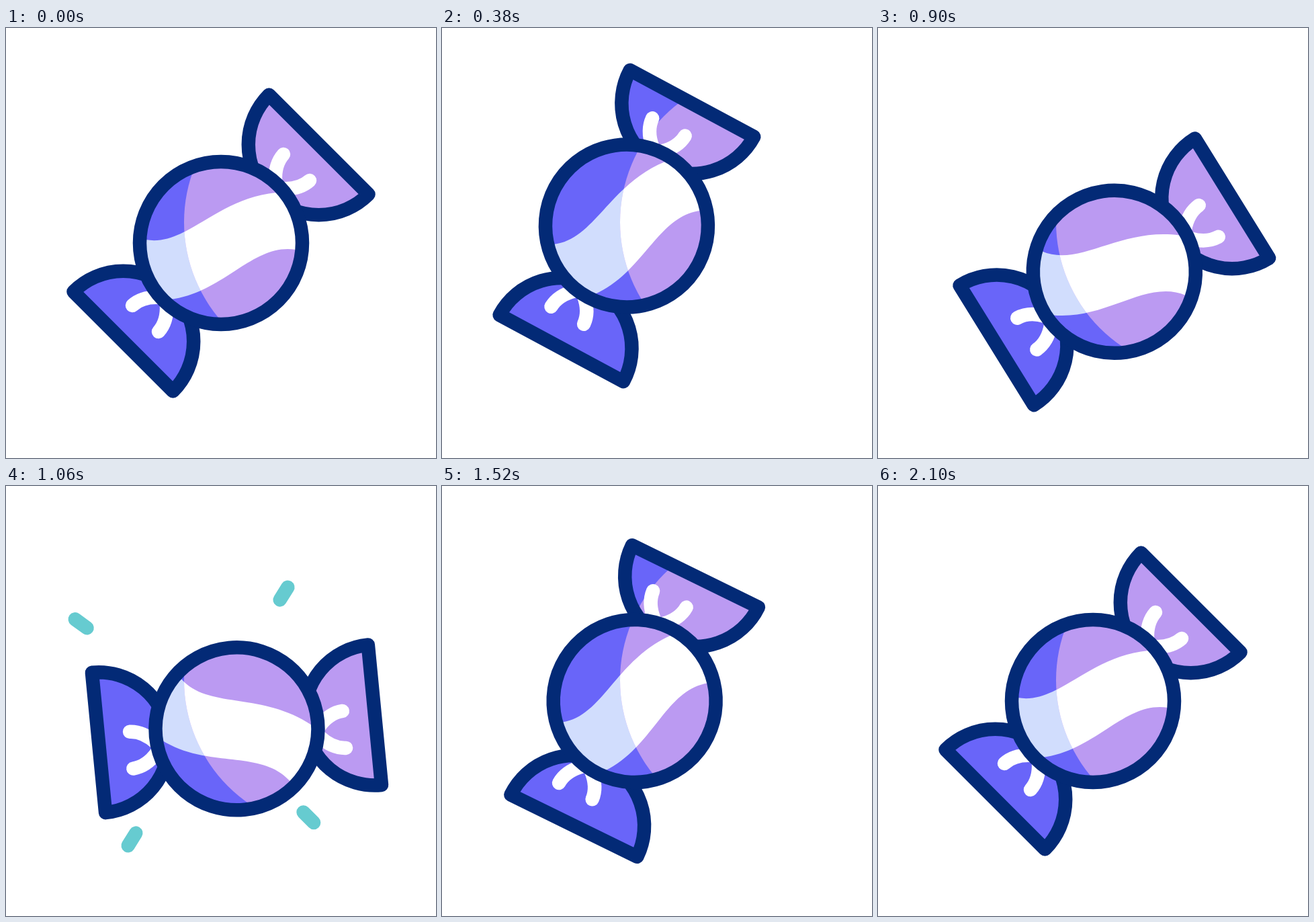
An HTML page with a canvas for the animation above (3.6 s loop, 640x640 px).

```html
<!DOCTYPE html>
<html lang="en">
<head>
<meta charset="utf-8">
<title>Swinging candy</title>
<style>
  html, body { margin: 0; height: 100%; overflow: hidden; background: #fff; }
  canvas { display: block; width: 100vw; height: 100vh; }
</style>
</head>
<body>
<canvas id="stage" width="640" height="640"></canvas>
<script>
const ctx = document.getElementById('stage').getContext('2d');
const LOOP = 3600, LINE = 20.5, REST = 320;
const NAVY = '#032a76', TEAL = '#66cbd0';
const SHADE = { body: '#6965f9', band: '#d1ddfd' };
const LIGHT = { body: '#bb9af2', band: '#ffffff' };

const clamp = u => Math.min(1, Math.max(0, u));
const easeInOut = u => 0.5 - 0.5 * Math.cos(Math.PI * clamp(u));
const easeOut = u => 1 - (1 - clamp(u)) ** 2;

// Swings from rest through each [ms, value] turning point in turn.
function swing(...turns) {
  return t => {
    let from = 0, value = 0;
    for (const [to, target] of turns) {
      value += (target - value) * easeInOut((t - from) / (to - from));
      from = to;
    }
    return value;
  };
}

const shiftX = swing([510, -53], [960, 35.5], [1370, -49], [1765, 0]);
const shiftY = swing([510, -30], [960, 46], [1450, 0]);
const tilt = swing([615, -24.5], [1155, 44.5], [1580, -22], [2100, 0]);
const foldSlide = swing([660, -23.5], [1000, 18], [1480, -20], [2100, 0]);

// Candy shapes, relative to its centre in the resting pose.
const ball = new Path2D();
ball.arc(0, 0, 121, 0, 2 * Math.PI);

const wing = new Path2D();
wing.arc(145.5, -146.5, 104.7, Math.PI / 4, Math.PI * 5 / 4);
wing.closePath();

const folds = new Path2D('M93 -132 C85 -123 80 -110 81 -92 M132 -93 C123 -85 110 -80 92 -81');

const band = new Path2D('M-112 -5 C-52 6 -8 -66 82 -75 L150 -75 L112 10 '
  + 'C48 -1 5 74 -76 84 L-120 84 Z');

// Outer end and heading in degrees of each spark.
const sparks = [[72, 176, -144], [439.5, 118.5, -58], [485, 528, 45], [161.5, 567.5, 122]];

function stroke(path, color) {
  ctx.strokeStyle = color;
  ctx.stroke(path);
}

// Paints once in shade, then again inside the lit circle fixed to the stage.
function paintLit(pose, paint) {
  for (const tone of [SHADE, LIGHT]) {
    ctx.save();
    if (tone === LIGHT) {
      ctx.beginPath();
      ctx.arc(488, 289, 223, 0, 2 * Math.PI);
      ctx.clip();
    }
    pose();
    paint(tone);
    ctx.restore();
  }
}

function drawWing(pose, slide) {
  paintLit(pose, tone => {
    ctx.fillStyle = tone.body;
    ctx.fill(wing);
  });
  ctx.save();
  pose();
  ctx.save();
  ctx.translate(slide * Math.SQRT1_2, slide * Math.SQRT1_2);
  stroke(folds, '#fff');
  ctx.restore();
  stroke(wing, NAVY);
  ctx.restore();
}

function drawBall(pose) {
  paintLit(pose, tone => {
    ctx.clip(ball);
    ctx.fillStyle = tone.body;
    ctx.fill(ball);
    ctx.fillStyle = tone.band;
    ctx.fill(band);
  });
  ctx.save();
  pose();
  stroke(ball, NAVY);
  ctx.restore();
}

function drawCandy(t) {
  const poseAt = turn => () => {
    ctx.translate(REST + shiftX(t), REST + shiftY(t));
    ctx.rotate(tilt(t) * Math.PI / 180 + turn);
  };
  drawWing(poseAt(0), foldSlide(t));
  drawWing(poseAt(Math.PI), -foldSlide(t));
  drawBall(poseAt(0));
}

function drawSparks(t) {
  const head = easeOut((t - 1000) / 300);
  const tail = easeInOut((t - 1080) / 220);
  if (head <= 0 || tail >= 1) return;
  for (const [x, y, heading] of sparks) {
    ctx.save();
    ctx.translate(x, y);
    ctx.rotate(heading * Math.PI / 180);
    const line = new Path2D();
    line.moveTo(60 * (tail - 1), 0);
    line.lineTo(60 * (head - 1), 0);
    stroke(line, TEAL);
    ctx.restore();
  }
}

const start = performance.now();

function frame() {
  const t = (performance.now() - start) % LOOP;
  ctx.fillStyle = '#fff';
  ctx.fillRect(0, 0, 640, 640);
  ctx.lineWidth = LINE;
  ctx.lineCap = ctx.lineJoin = 'round';
  drawSparks(t);
  drawCandy(t);
  requestAnimationFrame(frame);
}
frame();
</script>
</body>
</html>
```
